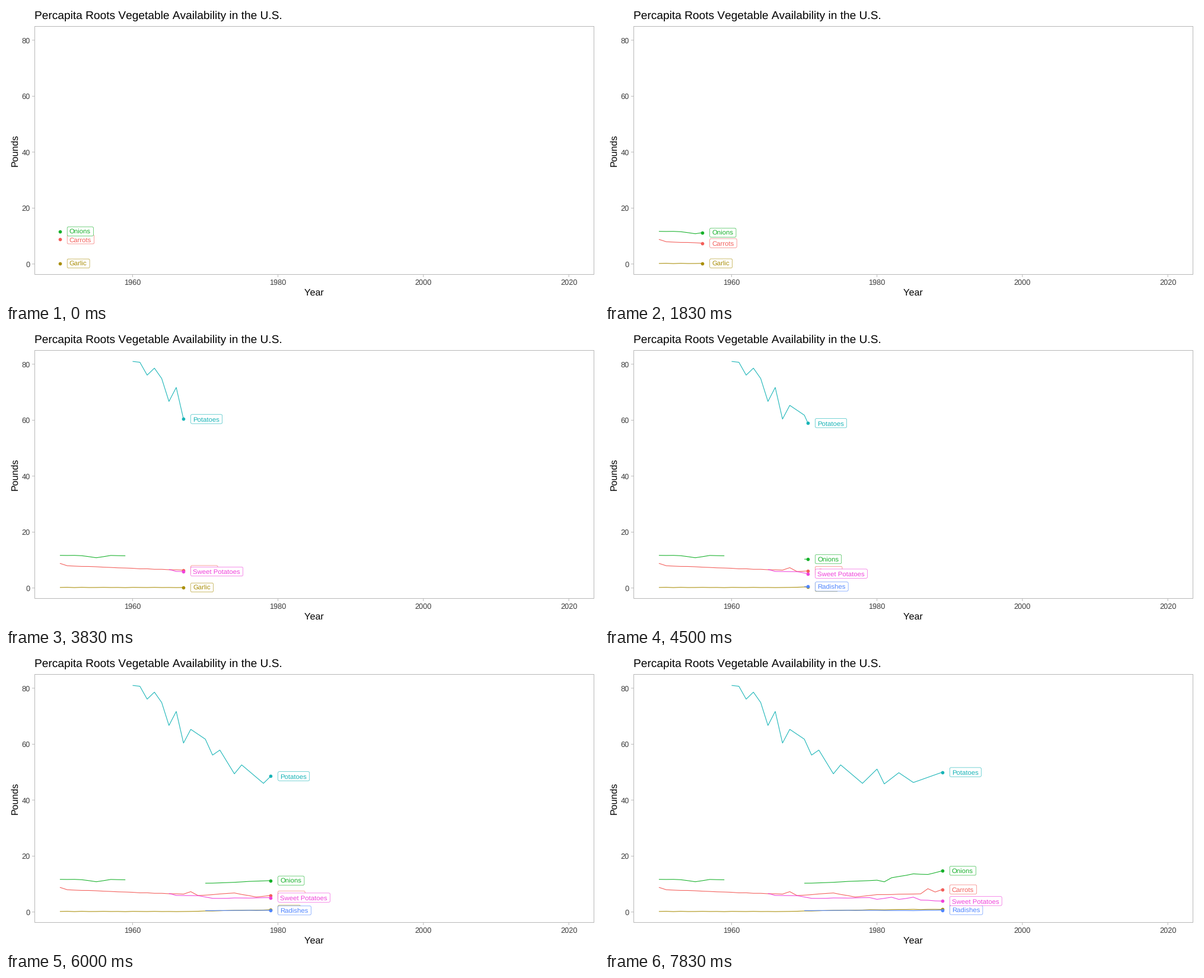
Recreate the animation shown at these times as a matplotlib script. Size 1000 by 500 pixels, loop 8 s.

```python
import matplotlib.pyplot as plt
import numpy as np
from matplotlib.animation import FuncAnimation
from matplotlib.patches import FancyBboxPatch

plt.rcParams["font.family"] = "Liberation Sans"
plt.rcParams["text.hinting"] = "no_hinting"
plt.rcParams["text.kerning_factor"] = 6  # plain advances, no kerning

W, H, DPI = 1000, 500, 100
PT = 72 / DPI  # points per pixel
LOOP_MS, TICK_MS = 8000, 40
POSES, HOLD = 48, 5  # poses per loop, extra poses spent on the first year
LEFT, RIGHT, TOP, BOTTOM = 48, 992, 34, 454
FIRST, LAST, STEPS = 1950, 2019, 74
BOX_H, PAD = 15.4, 3.6


def px(year):
    return LEFT + (np.asarray(year) - 1946.5) / 77 * (RIGHT - LEFT)


def py(pounds):
    return BOTTOM - (np.asarray(pounds) + 3.84) / 88.88 * (BOTTOM - TOP)


fig = plt.figure(figsize=(W / DPI, H / DPI), dpi=DPI, facecolor="white")
ax = fig.add_axes([0, 0, 1, 1])
ax.set_xlim(0, W)
ax.set_ylim(H, 0)
ax.axis("off")


def text(x, y, s, size, color="black", **kw):
    return ax.text(x, y, s, fontsize=size * PT, color=color, va="baseline", **kw)


def rule(xs, ys, width=1.0, color="#b8b8b8"):
    ax.plot(xs, ys, color=color, lw=width * PT, snap=False,
            solid_capstyle="butt", solid_joinstyle="miter")


def draw_axes():
    l, r, t, b = LEFT + 0.5, RIGHT - 0.5, TOP + 0.5, BOTTOM - 0.5
    rule([l, r, r, l, l, r], [t, t, b, b, t, t])
    for year in range(1960, 2021, 20):
        x = px(year)
        rule([x, x], [BOTTOM, BOTTOM + 4], 0.8, "#a9a9a9")
        text(x, 471, str(year), 12.8, "#3c3c3c", ha="center")
    for pounds in range(0, 81, 20):
        y = py(pounds)
        rule([LEFT - 4, LEFT], [y, y], 0.8, "#a9a9a9")
        text(40.8, y + 4.6, str(pounds), 12.8, "#3c3c3c", ha="right")
    text(LEFT, 22, "Percapita Roots Vegetable Availability in the U.S.", 19.2)
    text(520, 489, "Year", 16, ha="center")
    text(19.5, 244, "Pounds", 16, ha="center", rotation=90,
         rotation_mode="anchor")


def yearly(turns, wobble, rng):
    """Yearly values through (year of century, pounds) turns, with small noise."""
    at, pounds = np.array(turns).T
    years = np.arange(1900 + at[0], 1901 + at[-1])
    noise = rng.uniform(-wobble, wobble, len(years))
    return years, np.interp(years, 1900 + at, pounds) + noise


class Series:
    """A named line made of one or more runs of years."""

    def __init__(self, rank, name, color, wobble, *runs):
        rng = np.random.default_rng(rank)
        self.runs = [yearly(turns, wobble, rng) for turns in runs]
        self.lines = [ax.plot([], [], color=color, lw=1.07 * PT, zorder=3 + rank / 10,
                              solid_capstyle="butt", solid_joinstyle="round")[0]
                      for _ in runs]
        self.dot, = ax.plot([], [], "o", color=color, ms=5.7 * PT, mew=0,
                            zorder=4 + rank / 10)
        z = 5 + rank / 10
        self.label = text(0, 0, name, 11.38, color, zorder=z + 0.05)
        width = self.label.get_window_extent().width + 1 + 2 * PAD
        self.box = FancyBboxPatch((0, 0), width, BOX_H, fc="white", ec=color,
                                  boxstyle="round,pad=0,rounding_size=2.16",
                                  lw=0.58 * PT, zorder=z)
        ax.add_patch(self.box)

    def show(self, now):
        head = None
        for line, (years, values) in zip(self.lines, self.runs):
            if now < years[0]:
                line.set_data([], [])
                continue
            end = min(now, years[-1])
            seen = years < end
            tip = np.interp(end, years, values)
            line.set_data(px(np.append(years[seen], end)),
                          py(np.append(values[seen], tip)))
            if now <= years[-1]:
                head = tip
        for part in (self.dot, self.label, self.box):
            part.set_visible(head is not None)
        if head is not None:
            x, y, box_x = px(now), py(head), px(now + 1)
            self.dot.set_data([x], [y])
            self.box.set_x(box_x)
            self.box.set_y(y - BOX_H / 2)
            self.label.set_position((box_x + PAD, y + 4.3))


draw_axes()
series = [
    Series(0, "Carrots", "#f35e5a", 0.06,
           [(50, 8.8), (51, 8), (59, 7.1), (67, 6.4), (68, 7.3), (69, 5.9), (74, 6.8),
            (77, 5.3), (80, 6.2), (86, 6.5), (87, 8.3), (88, 7.1), (89, 8.1)]),
    Series(1, "Garlic", "#aa8f0a", 0.06,
           [(50, 0.2), (67, 0.2), (71, 0.4), (79, 0.8), (89, 1)]),
    Series(2, "Onions", "#17b12b", 0.06,
           [(50, 11.7), (53, 11.6), (55, 10.8), (57, 11.7), (59, 11.5)],
           [(70, 10.3), (73, 10.5), (80, 11.4), (81, 10.8), (82, 12.2),
            (85, 13.6), (87, 13.4), (89, 14.8)]),
    Series(3, "Potatoes", "#18b4b7", 0,
           [(60, 81), (61, 80.7), (62, 76.1), (63, 78.6), (64, 74.9), (65, 66.7),
            (66, 71.7), (67, 60.4), (68, 65.3), (70, 61.8), (71, 56.1), (72, 57.9),
            (74, 49.4), (75, 52.6), (78, 46), (80, 51.1), (81, 45.8), (83, 49.8),
            (85, 46.3), (89, 50)]),
    Series(4, "Radishes", "#5086ff", 0.03,
           [(70, 0.5), (76, 0.6), (85, 0.5), (89, 0.7)]),
    Series(5, "Sweet Potatoes", "#f042db", 0.06,
           [(65, 6.6), (66, 5.9), (69, 5.9), (71, 4.9), (79, 5.1), (80, 4.5),
            (82, 5.3), (83, 4.5), (85, 5.3), (86, 4.3), (89, 3.9)]),
]

# Each year lands on its nearest step; steps left over fall between two years.
years = np.arange(FIRST, LAST + 1)
year_steps = np.round((years - FIRST) * STEPS / (LAST - FIRST))


def update(frame):
    # A pose shows from the tick in which it begins.
    tick_end = (frame + 1) * TICK_MS - 1
    pose = tick_end * POSES // LOOP_MS
    now = np.interp(max(pose - HOLD, 0), year_steps, years)
    for s in series:
        s.show(now)
    return []


anim = FuncAnimation(fig, update, frames=LOOP_MS // TICK_MS, interval=TICK_MS,
                     repeat=True, repeat_delay=0)
plt.show()
```
